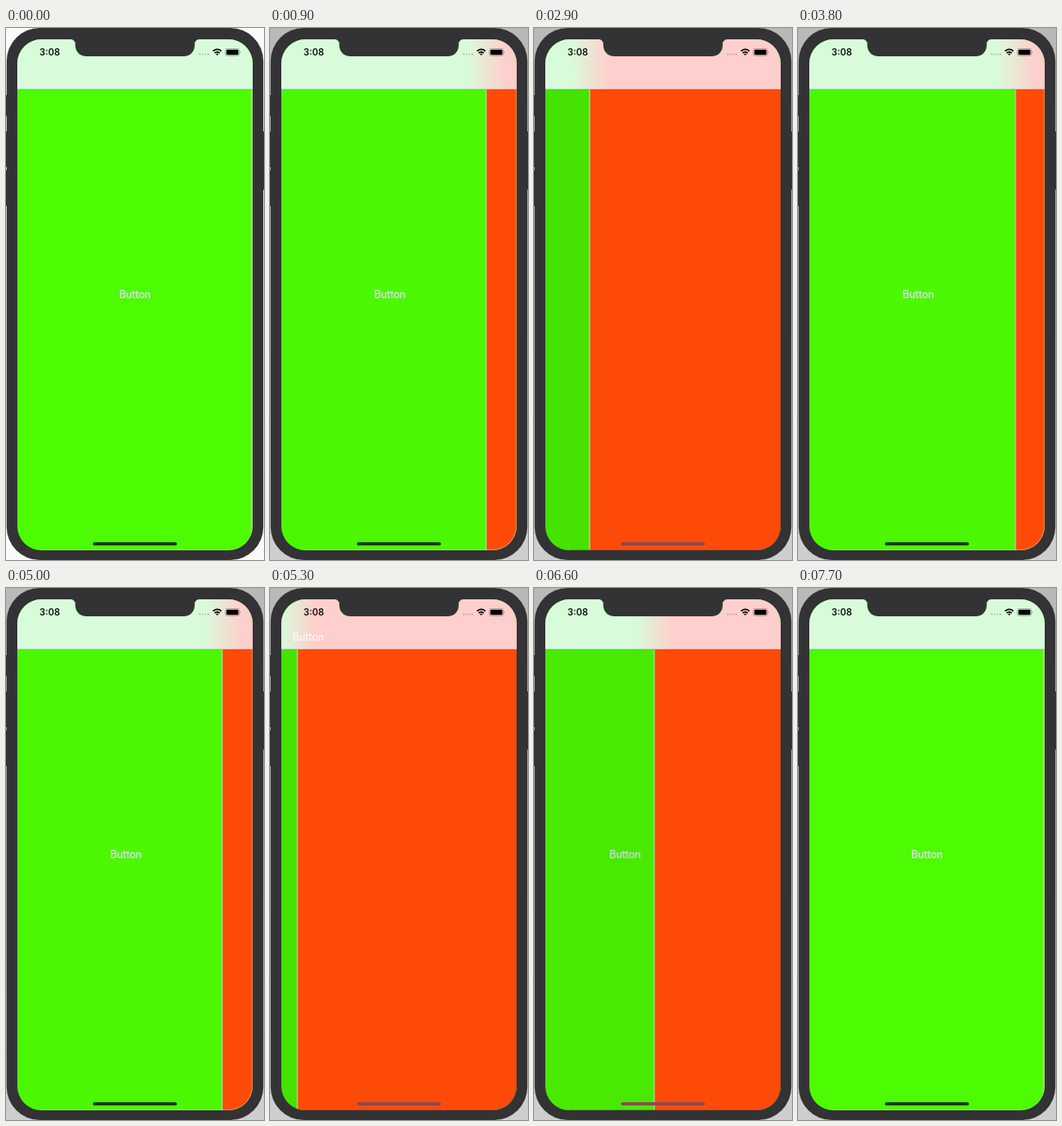
An HTML page for the animation above (7800 ms loop, 320 by 658 pixels).

```html
<!DOCTYPE html>
<html lang="en">
<head>
<meta charset="utf-8">
<title>Navigation push and swipe back</title>
<style>
  html, body { margin: 0; width: 100%; height: 100%; overflow: hidden; background: #fff; }
  svg { display: block; width: 320px; height: 658px; }
  text { font-family: Inter, Roboto, "Liberation Sans", sans-serif; }
</style>
</head>
<body>
<svg viewBox="0 0 320 658" width="320" height="658">
  <defs>
    <clipPath id="screen">
      <path d="M44 14H80A6 6 0 0 1 86 20V22A13 13 0 0 0 99 35H221A13 13 0 0 0 234 22V20A6 6 0 0 1 240 14H276A30 30 0 0 1 306 44V616A30 30 0 0 1 276 646H44A30 30 0 0 1 14 616V44A30 30 0 0 1 44 14Z"/>
    </clipPath>
    <linearGradient id="blend" gradientUnits="userSpaceOnUse" y1="0" y2="0">
      <stop offset="0" stop-color="#d8fcda"/>
      <stop offset="1" stop-color="#ffcfcd"/>
    </linearGradient>
    <linearGradient id="backdrop" x2="0" y2="1">
      <stop offset="0" stop-color="#b8b8b8"/>
      <stop offset="1" stop-color="#cecece"/>
    </linearGradient>
  </defs>

  <rect id="back" width="320" height="658"/>
  <path d="M0 83H3V109H0ZM0 128H3V172H0ZM0 176H3V220H0ZM317 128H320V200H317Z" fill="#333335"/>
  <rect x=".8" y="0" width="318.4" height="658" rx="41" fill="#333335"/>

  <g clip-path="url(#screen)">
    <rect x="14" y="14" width="292" height="632" fill="#4dfb02"/>
    <text id="label" y="334.3" font-size="12.7" text-anchor="middle" fill="#d6f0e4"
      stroke="#a4dc98" stroke-opacity=".5" stroke-width="1.6" paint-order="stroke">Button</text>
    <rect id="dim" x="14" y="76" width="292" height="570"/>
    <rect id="second" y="76" width="293" height="570" fill="#ff4b08"/>
    <rect id="edge" y="76" width="2" height="570" fill="#c6c8a0" opacity=".65"/>
    <rect x="14" y="14" width="292" height="62" fill="url(#blend)"/>
    <rect x="14" y="75.4" width="292" height=".8" opacity=".25"/>
    <text id="title" x="28" y="65.3" font-size="12.7" fill="#fff">Button</text>

    <text x="41.5" y="34" font-size="11.3" font-weight="600" fill="#111">3:08</text>
    <g fill="#000" opacity=".25">
      <circle cx="240.5" cy="32.5" r="1"/><circle cx="244" cy="32.5" r="1"/>
      <circle cx="247.5" cy="32.5" r="1"/><circle cx="251" cy="32.5" r="1"/>
    </g>
    <g fill="none" stroke="#000" stroke-width="1.7">
      <path d="M256.8 28.7Q262 24.2 267.2 28.7M258.8 31Q262 28.3 265.2 31"/>
      <path d="M260.4 32.2Q262 31 263.6 32.2L262 34Z" fill="#000" stroke="none"/>
    </g>
    <rect x="272" y="25.6" width="17.6" height="8.8" rx="2.4" fill="none" stroke="#000" stroke-opacity=".35" stroke-width=".8"/>
    <rect x="273.3" y="26.8" width="15" height="6.4" rx="1.3" fill="#000"/>
    <path d="M290.5 28.6Q292 30 290.5 31.4Z" fill="#000" opacity=".4"/>

    <rect id="home" x="107.7" y="636" width="104.4" height="4" rx="2"/>
    <path id="rim" d="M44 645.4H276A29.4 29.4 0 0 0 305.4 616V76" fill="none" stroke-opacity=".5"/>
  </g>
</svg>
<script>
const LOOP = 7800, STEP = 100, LEFT = 14, WIDTH = 292, RIGHT = LEFT + WIDTH;
const el = {};
for (const node of document.querySelectorAll("[id]")) el[node.id] = node;

const set = (node, attrs) => {
  for (const key in attrs) node.setAttribute(key, attrs[key]);
};
const clamp = v => Math.max(0, Math.min(1, v));

// Each swipe is a list of [time, progress] points.
const swipes = [
  [[2300, 0], [2400, .02], [2900, .19], [3400, .6], [3800, .877], [4100, 1]],
  [[6100, 0], [6200, .04], [6300, .118], [6700, .58], [7000, .91], [7250, 1]]
];

function slope(points, i) {
  const a = points[i - 1], b = points[i + 1];
  return a && b ? (b[1] - a[1]) / (b[0] - a[0]) : 0;
}

function follow(points, t) {
  const last = points.length - 1;
  if (t >= points[last][0]) return 1;
  const i = points.findIndex(point => point[0] > t) - 1;
  const [t0, p0] = points[i], [t1, p1] = points[i + 1];
  const d = t1 - t0, u = (t - t0) / d, v = 1 - u;
  return clamp(v * v * (1 + 2 * u) * p0 + u * u * (3 - 2 * u) * p1
    + d * u * v * (v * slope(points, i) - u * slope(points, i + 1)));
}

// Critically damped push after a tap.
function push(ms) {
  if (ms >= 550) return 0;
  const x = ms * .0124;
  return (1 + x) * Math.exp(-x);
}

// 1 shows the green page, 0 the red one.
function progress(t) {
  if (t < 850) return 1;
  if (t < 2300) return push(t - 850);
  if (t < 4950) return follow(swipes[0], t);
  if (t < 6100) return push(t - 4950);
  return follow(swipes[1], t);
}

function draw(t) {
  const p = progress(t);
  const split = LEFT + p * WIDTH;
  const soft = Math.min(24, split - LEFT, RIGHT - split) + .01;

  set(el.back, { fill: t < STEP ? "#fafafa" : "url(#backdrop)" });
  set(el.label, { x: 160 - .3 * WIDTH * (1 - p) });
  set(el.dim, { opacity: .1 * clamp((1 - p) * 1.25) });
  set(el.second, { x: split });
  set(el.edge, { x: Math.min(split, RIGHT - 1) - 1.5, visibility: p > 0 ? "visible" : "hidden" });
  set(el.blend, { x1: split - soft, x2: split + soft });
  set(el.title, { opacity: clamp((.21 - p) / .1) });
  set(el.home, { fill: p > .5 ? "#1c3c1a" : "#8c4a50" });
  set(el.rim, { stroke: p > .5 ? "#b4dca8" : "#7c5058" });
}

const start = performance.now();
function tick() {
  const t = (performance.now() - start) % LOOP;
  draw(Math.floor(t / STEP) * STEP);
  requestAnimationFrame(tick);
}
draw(0);
tick();
</script>
</body>
</html>
```
